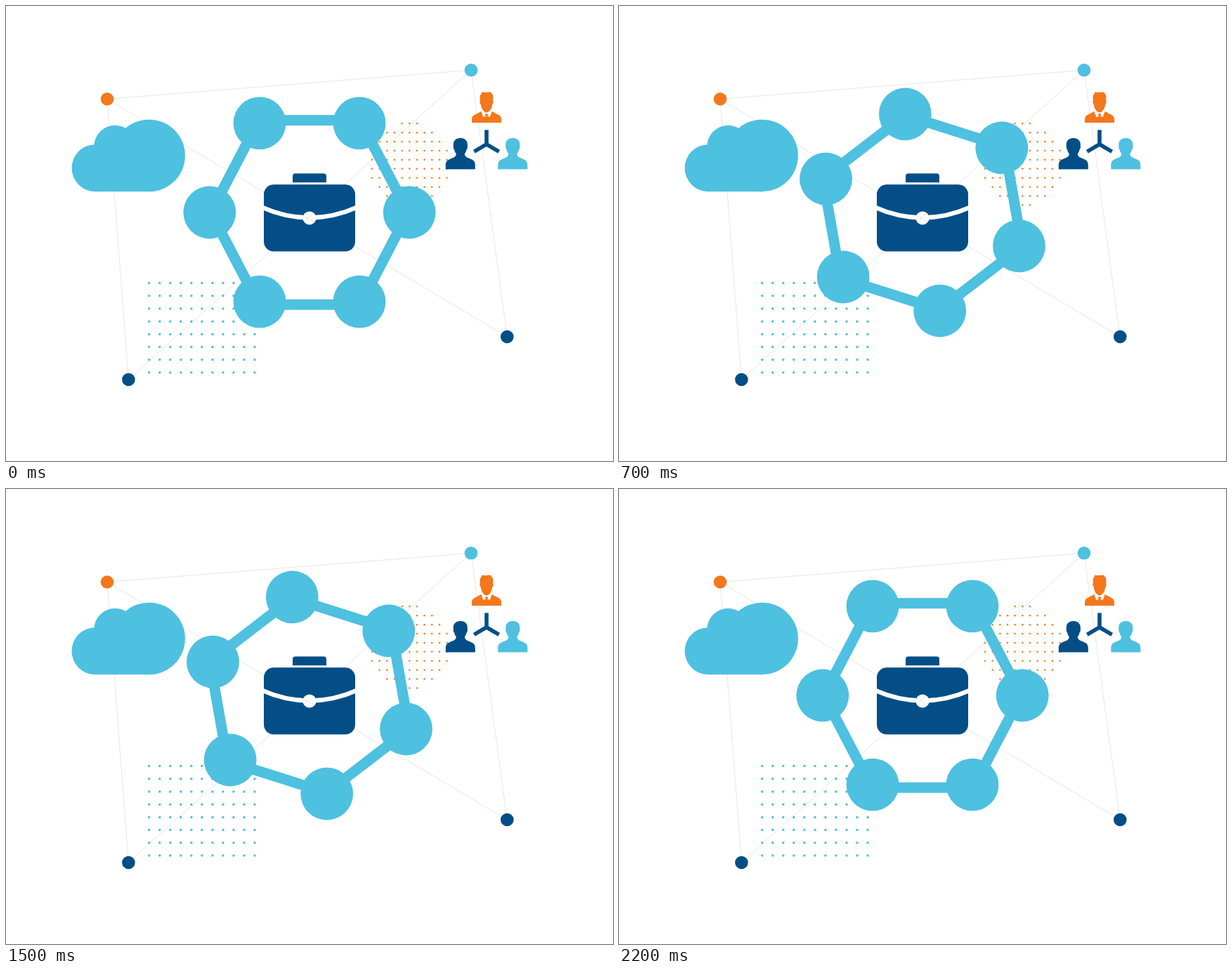
Write an HTML page that moves like this. It is 864 by 648 pixels and loops after 2700 ms.

```html
<!DOCTYPE html>
<html lang="en">
<head>
<meta charset="utf-8">
<title>Business network</title>
<style>
  html, body { margin: 0; width: 100%; height: 100%; overflow: hidden; background: #fff; }
  svg { display: block; width: 864px; height: 648px; }
  .sky { fill: #4ec0e0; }
  .navy { fill: #034e87; }
  .orange { fill: #f4771c; }
  .white { fill: #fff; }
  .web { fill: none; stroke: #e6e6e6; stroke-width: 1; }
  .frame { fill: none; stroke: #4ec0e0; stroke-width: 15; }
  .fork { fill: none; stroke: #034e87; stroke-width: 5.6; }
</style>
</head>
<body>
<svg viewBox="0 0 864 648">
  <defs>
    <mask id="strap" maskUnits="userSpaceOnUse" x="360" y="230" width="144" height="126">
      <rect x="360" y="230" width="144" height="126" fill="#fff"/>
      <path d="M363 286.2 Q432 317 501 286.2" fill="none" stroke="#000" stroke-width="6.4"/>
      <circle cx="432" cy="302" r="9.5"/>
    </mask>
    <path id="person" d="M-21 44.5 V39 C-21 34.5 -19.5 32 -15.5 30.3 L-8.5 27.2
      Q-6 26 -6 22.5 C-7.6 20.8 -8.3 18.8 -8.6 16.8 Q-10.4 15.6 -10 11.6
      C-10.8 4 -6.5 0 0 0 C6.5 0 10.8 4 10 11.6 Q10.4 15.6 8.6 16.8
      C8.3 18.8 7.6 20.8 6 22.5 Q6 26 8.5 27.2 L15.5 30.3
      C19.5 32 21 34.5 21 39 V44.5 Z"/>
  </defs>

  <path class="web" d="M144 132.5 L662 91.3 L713.3 471 Z M662 91.3 L174.4 532 L144 132.5"/>
  <g id="dots"></g>

  <circle class="orange" cx="144" cy="132.5" r="9.3"/>
  <circle class="sky" cx="662" cy="91.3" r="9.3"/>
  <circle class="navy" cx="713.3" cy="471" r="9.3"/>
  <circle class="navy" cx="174.4" cy="532" r="9.3"/>

  <g class="sky">
    <circle cx="127" cy="230.8" r="33.5"/>
    <circle cx="155.3" cy="200" r="30"/>
    <circle cx="203.6" cy="213" r="51.3"/>
    <rect x="127" y="200" width="76.6" height="64.3"/>
  </g>

  <g id="ring">
    <path class="frame" d="M-72 -131.2 H72 L140.5 0 L72 131.2 H-72 L-140.5 0 Z"/>
  </g>

  <g class="navy">
    <path d="M408 251.3 V242.5 Q408 238.5 412 238.5 H452 Q456 238.5 456 242.5 V251.3 Z"/>
    <rect x="367" y="254.3" width="130" height="95.2" rx="14" mask="url(#strap)"/>
  </g>

  <path class="fork" d="M684 176.5 V197 L666.3 207.3 M684 197 L701.7 207.3"/>
  <use href="#person" class="navy" x="646.8" y="188"/>
  <use href="#person" class="sky" x="721.3" y="188"/>

  <g transform="translate(684 122.5)">
    <path class="orange" d="M-21 43.7 V39 C-21 35.5 -19.5 33.4 -16 32 L-7.5 27.6 H7.5 L16 32
      C19.5 33.4 21 35.5 21 39 V43.7 Z"/>
    <path class="white" d="M-8 26.5 L-4.6 36 L-2.6 34.2 L0 43.2 L2.6 34.2 L4.6 36 L8 26.5 Z"/>
    <path class="orange" d="M-2.2 31 H2.2 L1.4 34 L3 40 L0 43.7 L-3 40 L-1.4 34 Z"/>
    <path class="orange" d="M-7 0.3 Q-1 1 3 0 Q7 0 7.2 2.2 Q9.8 3 9.3 10 V12 Q10.4 15.6 8.4 17
      C7.8 21.5 6.4 24.4 4.6 26.4 Q2.4 29.3 0 29.3 Q-2.4 29.3 -4.6 26.4
      C-6.4 24.4 -7.8 21.5 -8.4 17 Q-10.4 15.6 -9.3 12 V10 Q-10 4.6 -7.6 3 Z"/>
  </g>
</svg>
<script>
  const NS = 'http://www.w3.org/2000/svg';
  const dots = document.getElementById('dots');
  const ring = document.getElementById('ring');

  function disc(parent, x, y, r, cls) {
    const c = document.createElementNS(NS, 'circle');
    c.setAttribute('cx', x);
    c.setAttribute('cy', y);
    c.setAttribute('r', r);
    c.setAttribute('class', cls);
    parent.append(c);
  }

  // Rectangular dot field
  for (let row = 0; row < 8; row++) {
    for (let col = 0; col < 11; col++) {
      disc(dots, 203.7 + col * 15.03, 394.6 + row * 18.2, 1.75, 'sky');
    }
  }

  // Round dot field
  for (let row = -4.5; row <= 4.5; row++) {
    for (let col = -5; col <= 5; col++) {
      const x = col * 10.65, y = row * 12.9;
      if (Math.hypot(x, y) < 60) disc(dots, 574.3 + x, 225.4 + y, 1.25, 'orange');
    }
  }

  for (const s of [-1, 1]) {
    disc(ring, s * 142.2, 0, 37.4, 'sky');
    for (const x of [-71, 71]) disc(ring, x, s * 127.1, 37.4, 'sky');
  }

  // One full turn back, a rest, one full turn forward, a rest
  const LOOP = 2700, STEP = 100, TURN = 9, RETURN = 13;
  const steps = n => Math.max(0, Math.min(TURN, n));
  const start = performance.now();

  function draw() {
    const n = Math.floor(((performance.now() - start) % LOOP) / STEP);
    const angle = (steps(n - RETURN) - steps(n)) * 360 / TURN;
    ring.setAttribute('transform', `translate(432 294) rotate(${angle})`);
    requestAnimationFrame(draw);
  }
  draw();
</script>
</body>
</html>
```
